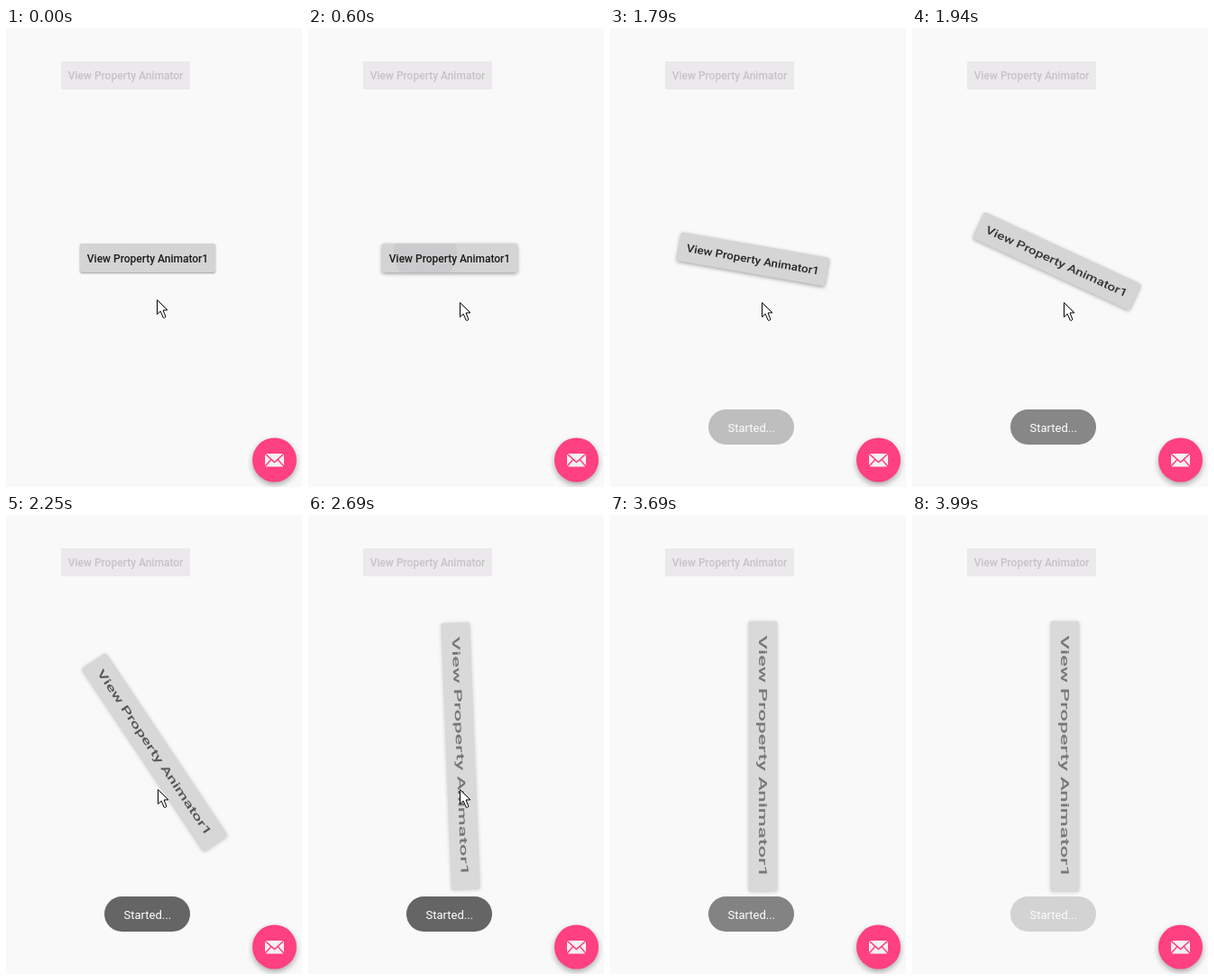
An HTML page with a canvas for the animation above (4.09 s loop, 328 by 509 pixels).

```html
<!DOCTYPE html>
<html lang="en">
<head>
<meta charset="utf-8">
<title>View Property Animator</title>
<style>
  html, body { margin: 0; width: 100%; height: 100%; overflow: hidden; background: #f9f9f9; }
  canvas { display: block; }
</style>
</head>
<body>
<canvas id="stage" width="328" height="509"></canvas>
<script>
const ctx = document.getElementById('stage').getContext('2d');
const LOOP = 4090;
const BACKDROP = 0xf9;

// The screen refreshes only at these times; each entry lists what changes.
const steps = [
  { at: 0, cursor: [167, 301], press: 0, ripple: 0, turn: 0, toast: 0 },
  { at: 300, cursor: [168, 304] },
  { at: 450, press: 0.5, ripple: 22 },
  { at: 600, press: 1, ripple: 35 },
  { at: 1640, ripple: 0, turn: 0.025, toast: 0.05 },
  { at: 1790, turn: 0.11, toast: 0.4 },
  { at: 1940, turn: 0.275, toast: 0.77 },
  { at: 2250, turn: 0.625, toast: 1 },
  { at: 2690, turn: 0.975 },
  { at: 2830, turn: 1 },
  { at: 2960, cursor: [239, 323] },
  { at: 3080, cursor: [245, 432] },
  { at: 3230, cursor: [277, 476] },
  { at: 3390, cursor: null },
  { at: 3690, toast: 0.8 },
  { at: 3840, toast: 0.53 },
  { at: 3990, toast: 0.26 }
];

const stateAt = time => Object.assign({}, ...steps.filter(step => step.at <= time));
const mix = (a, b, k) => a + (b - a) * k;
const gray = level => {
  const v = Math.round(level);
  return `rgb(${v},${v},${v})`;
};

function shadow(alpha, blur, dy) {
  ctx.shadowColor = `rgba(0,0,0,${alpha})`;
  ctx.shadowBlur = blur;
  ctx.shadowOffsetY = dy;
}

function fillRound(x, y, w, h, r, color) {
  ctx.beginPath();
  ctx.roundRect(x, y, w, h, r);
  ctx.fillStyle = color;
  ctx.fill();
}

function trace(points) {
  ctx.beginPath();
  points.forEach(([x, y]) => ctx.lineTo(x, y));
  ctx.closePath();
}

function label(text, x, baseline, font, color) {
  ctx.font = font + ' Roboto, sans-serif';
  ctx.textAlign = 'center';
  ctx.fillStyle = color;
  ctx.fillText(text, x, baseline);
}

function drawDisabledButton() {
  fillRound(61, 37, 143, 31, 1, '#ebe9eb');
  label('View Property Animator', 132.5, 57, '500 12px', '#c5c3c5');
}

function drawButton({ press, ripple, turn }) {
  ctx.save();
  ctx.translate(157 + 12.4 * turn, 255 + 12.8 * turn);
  ctx.rotate(turn * Math.PI / 2);
  ctx.scale(1 + turn, 1);

  ctx.save();
  shadow(mix(0.38, 0.18, turn), mix(2, 4, press), mix(1, 1.5, press) * (1 - 0.7 * turn));
  fillRound(-75, -16, 150, 32, 2, gray(mix(0xd4, 0xd9, turn)));
  ctx.restore();

  if (ripple) {
    ctx.save();
    ctx.clip();
    ctx.beginPath();
    ctx.arc(-27, -6, ripple, 0, Math.PI * 2);
    ctx.fillStyle = '#cbcacc';
    ctx.fill();
    ctx.restore();
  }
  label('View Property Animator1', 0, 4.5, '500 12px', gray(mix(0x1c, 0x78, turn)));
  ctx.restore();
}

function drawToast({ toast }) {
  if (!toast) return;
  fillRound(109, 423, 95, 39, 19.5, gray(mix(BACKDROP, 0x65, toast)));
  label('Started...', 156.8, 447.7, '13px', gray(mix(BACKDROP, 255, toast)));
}

function drawMailButton() {
  ctx.save();
  shadow(0.32, 6, 3);
  ctx.beginPath();
  ctx.arc(297.5, 479, 24.5, 0, Math.PI * 2);
  ctx.fillStyle = '#ff4081';
  ctx.fill();
  ctx.restore();

  ctx.save();
  ctx.translate(297.5, 479.2);
  ctx.fillStyle = '#f4f0f2';
  const panels = [
    [[-9.5, -7.2], [9.5, -7.2], [0, 1.3]],
    [[-10.5, -6.2], [-4.6, -0.6], [-10.5, 5.8]],
    [[10.5, -6.2], [4.6, -0.6], [10.5, 5.8]],
    [[-9.7, 7.2], [-3.6, 0.4], [0, 3.4], [3.6, 0.4], [9.7, 7.2]]
  ];
  for (const panel of panels) {
    trace(panel);
    ctx.fill();
  }
  ctx.restore();
}

function drawCursor({ cursor }) {
  if (!cursor) return;
  ctx.save();
  ctx.translate(cursor[0] + 0.5, cursor[1] + 0.5);
  trace([[0, 0], [0, 16], [3.7, 12.6], [6.7, 19.5], [8, 20], [9.4, 18.6], [6.5, 11.5], [11.3, 11.3]]);
  ctx.fillStyle = '#fff';
  ctx.fill();
  ctx.strokeStyle = '#000';
  ctx.lineWidth = 1;
  ctx.stroke();
  ctx.restore();
}

function render() {
  const state = stateAt(performance.now() % LOOP);
  ctx.fillStyle = gray(BACKDROP);
  ctx.fillRect(0, 0, 328, 509);
  drawDisabledButton();
  drawButton(state);
  drawMailButton();
  drawToast(state);
  drawCursor(state);
  requestAnimationFrame(render);
}
render();
</script>
</body>
</html>
```
